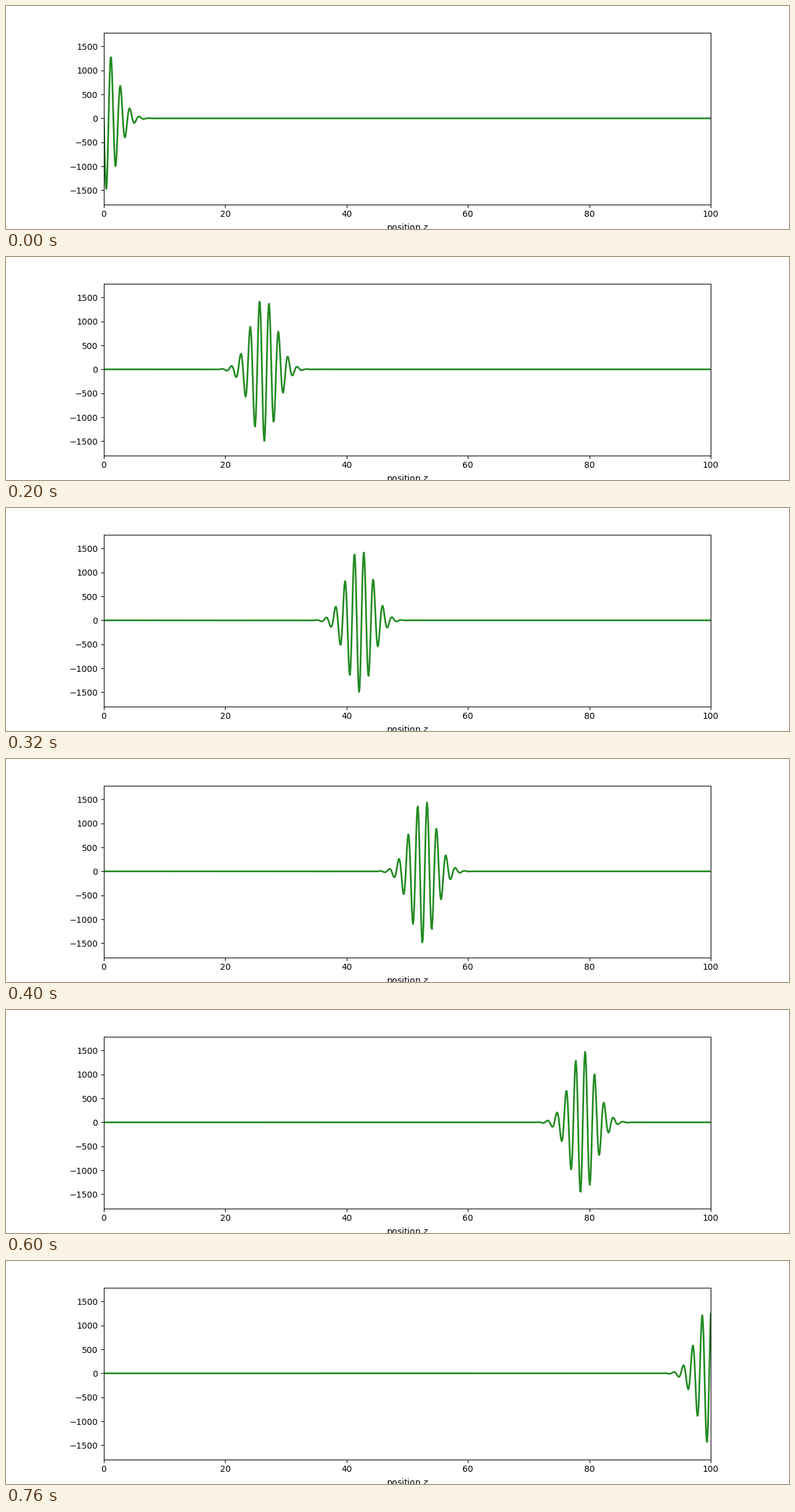
Recreate the animation shown at these times as a matplotlib script. Size 1280x366 px, loop 800 ms.

```python
import numpy as np
import matplotlib.pyplot as plt
from matplotlib.animation import FuncAnimation

FRAMES = 20
LENGTH = 100
AMP = 1500
WIDTH_SQ = 9.27      # squared 1/e half-width of the envelope
WAVENUMBER = 4.03
SLIP = 0.0412        # carrier phase lost against the envelope per unit time

z = np.linspace(0, LENGTH, 1000)
times = np.linspace(0, LENGTH, FRAMES)


def pulse(t):
    """Gaussian wave packet whose carrier slips behind its envelope."""
    d = z - t
    return -AMP * np.exp(-d**2 / WIDTH_SQ) * np.sin(WAVENUMBER * d + SLIP * t)


fig, ax = plt.subplots(figsize=(12.8, 3.66), dpi=100)
ax.set_xlim(0, LENGTH)
ax.set_ylim(-1797, 1785)
ax.set_xlabel("position $z$")
line, = ax.plot(z, pulse(0), color="forestgreen", lw=2)


def update(i):
    line.set_ydata(pulse(times[i]))
    return line,


anim = FuncAnimation(fig, update, frames=FRAMES, interval=40,
                     repeat=True, repeat_delay=0)
plt.show()
```
